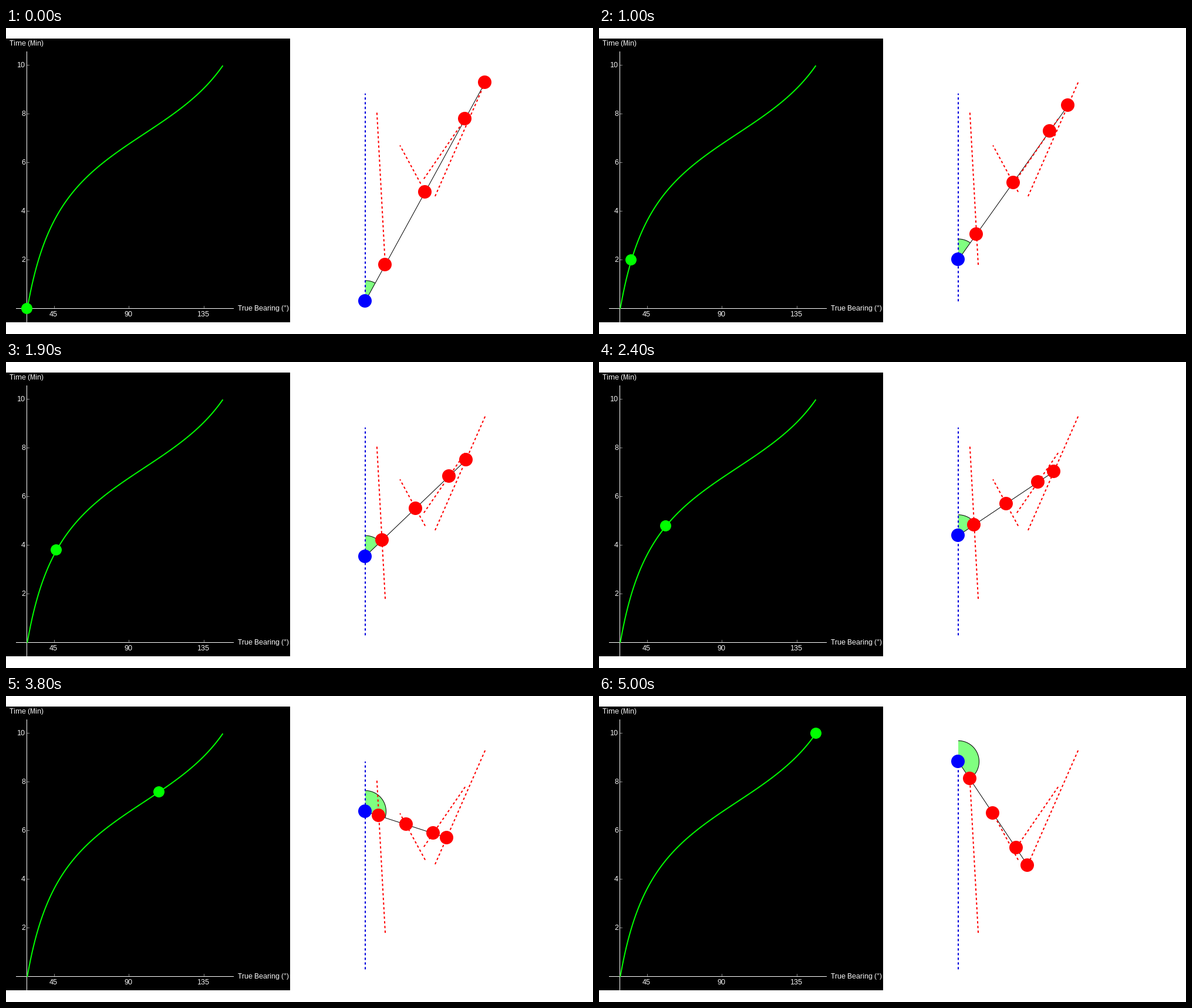
A matplotlib script that plays this animation: 1000 px wide and 522 px high, repeating every 5.1 s.

```python
import numpy as np
import matplotlib.pyplot as plt
from matplotlib.animation import FuncAnimation
from matplotlib.patches import Circle, Rectangle, Wedge

W, H, DPI = 1000, 522, 100
FRAMES, INTERVAL = 51, 100
LIME = "#00ff00"

plt.rcParams.update({
    "font.family": "Liberation Sans",
    "text.hinting": "native",
    "text.hinting_factor": 1,
    "path.simplify": False,
    "path.snap": False,
})


def px(size):
    """Pixels to points."""
    return size * 72 / DPI


fig = plt.figure(figsize=(W / DPI, H / DPI), dpi=DPI, facecolor="white")
ax = fig.add_axes([0, 0, 1, 1])
ax.set_xlim(0, W)
ax.set_ylim(H, 0)
ax.axis("off")

# Straight courses of the observer and the far target, start to end.
OBSERVER = np.array([[612.0, 466.3], [612.0, 111.75]])
TARGET = np.array([[816.2, 92.9], [730.2, 288.8]])
RATIOS = (1 / 6, 1 / 2, 5 / 6, 1)
SECTOR_RADIUS = 35.5
ORIGIN = (35.5, 478.5)


def along(course, u):
    return course[0] + (course[1] - course[0]) * u


def bearing(u):
    """Clockwise angle from north to the target, in degrees."""
    dx, dy = along(TARGET, u) - along(OBSERVER, u)
    return np.degrees(np.arctan2(dx, -dy))


def bearing_x(deg):
    return 82.5 + (deg - 45) * 127.5 / 45


def minute_y(minute):
    return 479 - 41.5 * minute


def pixel(value):
    """Centre of the pixel that dots and ticks settle on."""
    return np.floor(np.asarray(value) - 0.4) + 0.5


def line(xs, ys, color, width, z, **kw):
    return ax.plot(xs, ys, color=color, lw=px(width), zorder=z,
                   solid_capstyle="butt", dash_capstyle="butt", **kw)[0]


def label(x, y, text, ha="left"):
    ax.text(x, y, text, color="white", fontsize=px(12), ha=ha,
            va="baseline", zorder=3)


def dot(center, radius, color):
    return ax.add_patch(Circle(center, radius, fc=color, ec="none", zorder=6))


def draw_graph():
    ax.add_patch(Rectangle((0, 18), 484, 484, fc="black", ec="none", zorder=1))
    for deg in (45, 90, 135):
        x = pixel(bearing_x(deg))
        line([x, x], [474, 478], "#808080", 1, 2)
        label(x - 1.5, 492, str(deg), "center")
    for minute in range(2, 11, 2):
        y = pixel(minute_y(minute))
        line([36, 40], [y, y], "#808080", 1, 2)
        label(33, y + 3.5, str(minute), "right")
    line([17, 388], [ORIGIN[1]] * 2, "white", 1, 2)
    line([ORIGIN[0]] * 2, [40, 502], "white", 1, 2)
    label(6, 30, "Time (Min)")
    label(395, 482, "True Bearing (°)")
    us = np.linspace(0, 1, 201)
    line([bearing_x(bearing(u)) for u in us], minute_y(10 * us), LIME, 2, 4)


def draw_tracks():
    for ratio in (0, *RATIOS):
        track = OBSERVER + (TARGET - OBSERVER) * ratio
        color = "red" if ratio else "#0000dd"
        line(track[:, 0], track[:, 1], color, 2, 4, ls=(0, (2, 2)))


draw_graph()
draw_tracks()
marker = dot(ORIGIN, 9.5, LIME)
sector = ax.add_patch(Wedge(OBSERVER[0], SECTOR_RADIUS, -90, 0,
                            fc="#80ff80", ec="none", zorder=1))
arc = line([], [], "black", 1, 2)
sight = line([], [], "black", 1, 3)
observer_dot = dot(OBSERVER[0], 11.5, "blue")
target_dots = [dot(TARGET[0], 11.5, "red") for _ in RATIOS]


def update(frame):
    u = frame / (FRAMES - 1)
    own, far = along(OBSERVER, u), along(TARGET, u)
    deg = bearing(u)
    marker.center = pixel((bearing_x(deg), minute_y(10 * u)))
    observer_dot.center = pixel(own)
    for circle, ratio in zip(target_dots, RATIOS):
        circle.center = pixel(own + (far - own) * ratio)
    sight.set_data(*zip(own, far))
    sector.set_center(own)
    sector.set_theta2(deg - 90)
    angles = np.radians(np.linspace(0, deg, 60))
    arc.set_data(own[0] + SECTOR_RADIUS * np.sin(angles),
                 own[1] - SECTOR_RADIUS * np.cos(angles))
    return [marker, sector, arc, sight, observer_dot, *target_dots]


anim = FuncAnimation(fig, update, frames=FRAMES, interval=INTERVAL,
                     init_func=lambda: update(0), repeat=True, repeat_delay=0)
plt.show()
```
